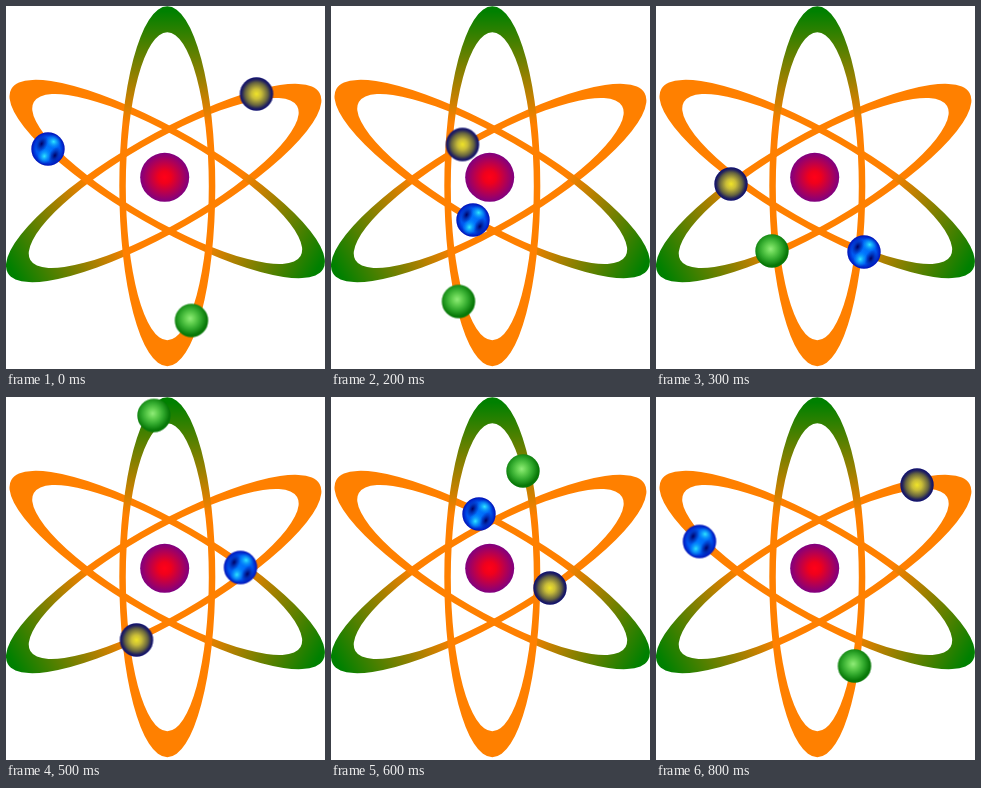
Write an HTML page that moves like this. It is 319 by 363 pixels and loops after 900 ms.

```html
<!DOCTYPE html>
<html lang="en">
<head>
<meta charset="utf-8">
<title>Atom</title>
<style>
  html, body { margin: 0; width: 100%; height: 100%; overflow: hidden; background: #fff; }
  svg { display: block; width: 100%; height: 100%; }
  .electron { animation: 900ms step-end infinite; }
  #blue { animation-name: blue; }
  #yellow { animation-name: yellow; }
  #green { animation-name: green; }

  @keyframes blue {
    0%, 100% { transform: translate(42px, 143px); }
    11.111% { transform: translate(91px, 181px); }
    22.222% { transform: translate(142px, 214px); }
    33.333% { transform: translate(208px, 246px); }
    44.444% { transform: translate(268px, 262px); }
    55.555% { transform: translate(234.5px, 170.5px); }
    66.666% { transform: translate(148px, 117px); }
    77.777% { transform: translate(66.5px, 82px); }
    88.888% { transform: translate(43.5px, 144.5px); }
  }
  @keyframes yellow {
    0%, 100% { transform: translate(250.5px, 88px); }
    11.111% { transform: translate(191px, 110px); }
    22.222% { transform: translate(131.5px, 138.5px); }
    33.333% { transform: translate(75px, 178px); }
    44.444% { transform: translate(29px, 218.5px); }
    55.555% { transform: translate(130.5px, 243px); }
    66.666% { transform: translate(219px, 191px); }
    77.777% { transform: translate(294px, 124.5px); }
    88.888% { transform: translate(261px, 88px); }
  }
  @keyframes green {
    0%, 100% { transform: translate(185.5px, 314.5px); }
    11.111% { transform: translate(156px, 346px); }
    22.222% { transform: translate(127.5px, 295.5px); }
    33.333% { transform: translate(116px, 245px); }
    44.444% { transform: translate(113.5px, 192.5px); }
    55.555% { transform: translate(148px, 18.5px); }
    66.666% { transform: translate(192px, 74px); }
    77.777% { transform: translate(202.5px, 164.5px); }
    88.888% { transform: translate(198.5px, 269px); }
  }
</style>
</head>
<body>
<svg viewBox="0 0 319 363">
  <defs>
    <linearGradient id="ringFill" gradientUnits="userSpaceOnUse" x1="0" y1="-175" x2="0" y2="-62">
      <stop offset="0" stop-color="#008000"/>
      <stop offset="1" stop-color="#ff8000"/>
    </linearGradient>
    <radialGradient id="nucleusFill">
      <stop offset="0" stop-color="#ff0018"/>
      <stop offset=".25" stop-color="#f0001c"/>
      <stop offset="1" stop-color="#800080"/>
    </radialGradient>
    <radialGradient id="yellowFill">
      <stop offset="0" stop-color="#f0e428"/>
      <stop offset=".3" stop-color="#c8bc38"/>
      <stop offset=".68" stop-color="#66643f"/>
      <stop offset=".86" stop-color="#25255c"/>
      <stop offset="1" stop-color="#0c0c70"/>
    </radialGradient>
    <radialGradient id="greenFill" cx=".46" cy=".44">
      <stop offset="0" stop-color="#90ec78"/>
      <stop offset=".3" stop-color="#62d050"/>
      <stop offset=".65" stop-color="#30a82c"/>
      <stop offset="1" stop-color="#087808"/>
    </radialGradient>
    <radialGradient id="blueFill">
      <stop offset="0" stop-color="#0078ff"/>
      <stop offset=".7" stop-color="#0058f0"/>
      <stop offset="1" stop-color="#0010b8"/>
    </radialGradient>
    <radialGradient id="glow">
      <stop offset="0" stop-color="#30e8ff"/>
      <stop offset="1" stop-color="#00a0ff" stop-opacity="0"/>
    </radialGradient>
    <radialGradient id="shade">
      <stop offset="0" stop-color="#000060"/>
      <stop offset="1" stop-color="#0010a0" stop-opacity="0"/>
    </radialGradient>
    <path id="ring" fill="url(#ringFill)" fill-rule="evenodd"
      d="M0-180A48 180 0 0 1 0 180A48 180 0 0 1 0-180ZM0-154A41.5 154 0 0 1 0 154A41.5 154 0 0 1 0-154Z"/>
  </defs>

  <use href="#ring" transform="translate(157.7 177) rotate(-120)"/>
  <use href="#ring" transform="translate(161.2 173) rotate(120)"/>
  <use href="#ring" transform="translate(161.3 180.3)"/>
  <circle cx="158.7" cy="171.3" r="24.5" fill="url(#nucleusFill)"/>

  <g id="blue" class="electron">
    <circle r="16.7" fill="url(#blueFill)"/>
    <ellipse cx="-8" cy="-2" rx="6" ry="9" fill="url(#shade)" transform="rotate(25)"/>
    <ellipse cx="9" cy="3" rx="6" ry="9" fill="url(#shade)" transform="rotate(25)"/>
    <ellipse cx="-1" cy="8" rx="7" ry="8" fill="url(#glow)" transform="rotate(20)"/>
    <ellipse cx="2" cy="-9" rx="8" ry="7" fill="url(#glow)" transform="rotate(25)"/>
  </g>
  <g id="yellow" class="electron"><circle r="16.7" fill="url(#yellowFill)"/></g>
  <g id="green" class="electron"><circle r="16.7" fill="url(#greenFill)"/></g>
</svg>
</body>
</html>
```
